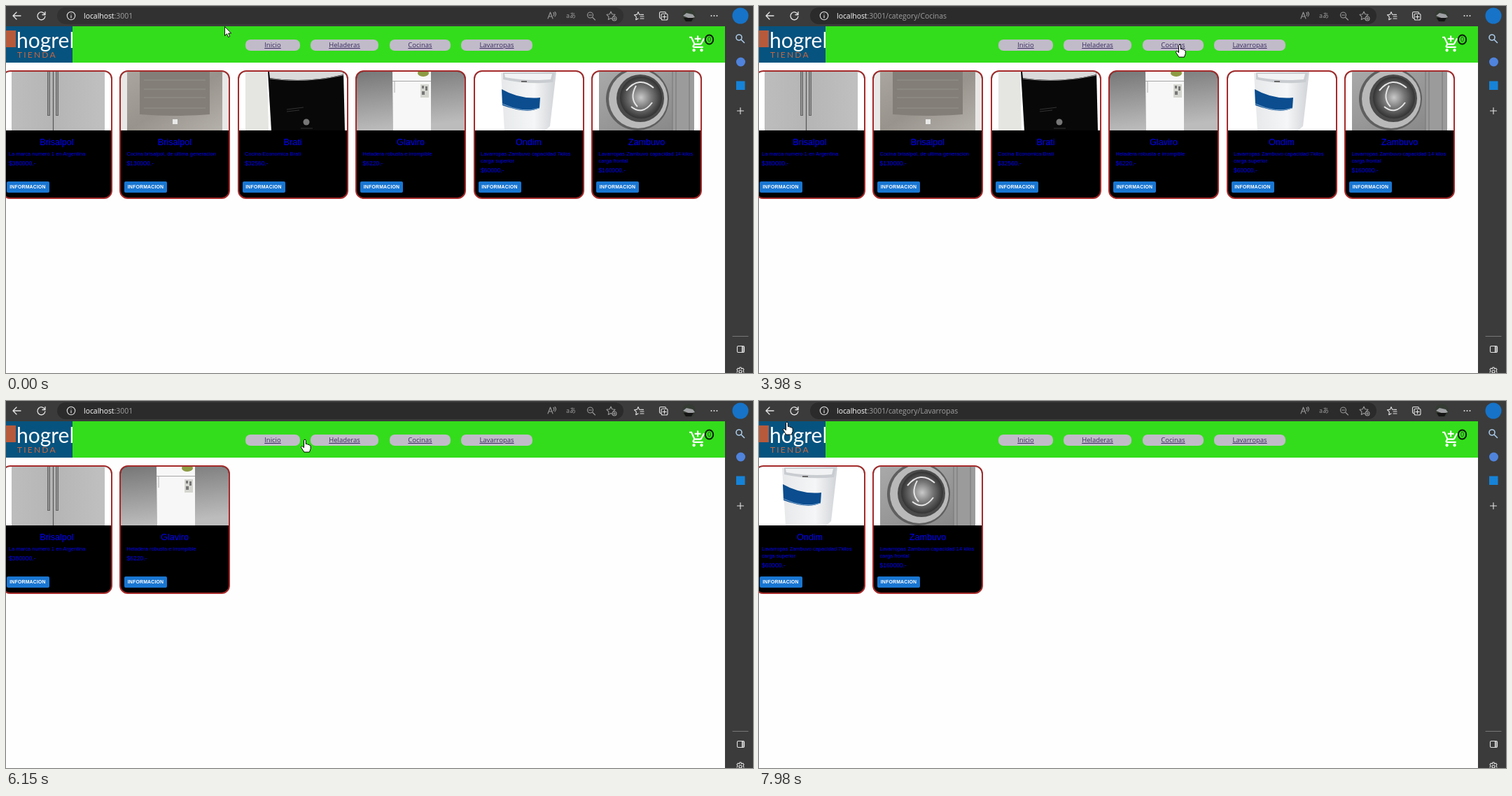
Recreate the animation shown at these times as an HTML page. Size 1067 by 525 pixels, loop 8 s.

```html
<!DOCTYPE html>
<html lang="es">
<head>
<meta charset="utf-8">
<title>Tienda</title>
<style>
html, body { margin: 0; width: 100%; height: 100%; overflow: hidden; background: #3b3b3b; }
#stage { position: relative; width: 1067px; height: 525px; overflow: hidden; background: #3b3b3b; font-family: "Liberation Sans", Arial, sans-serif; }
#stage > *, .pill, .card > * { position: absolute; }
.bar { left: 73px; top: 2px; width: 809px; height: 24px; border-radius: 12px; background: #2b2b2b; animation: barHover 8s step-end infinite; }
.url { left: 111px; top: 7px; font: 10.4px/15px "Open Sans", sans-serif; color: #fff; white-space: pre; }
.url span, .url i { color: #a0a0a0; font-style: normal; }
.url i { position: absolute; }
.page { left: 0; top: 29px; width: 1027px; height: 496px; background: #fefefe; }
.header { left: 0; top: 29px; width: 1027px; height: 52px; background: #33dd1b; }
.pill { top: 19px; height: 16px; border-radius: 7px; background: #c1bbc9; text-align: center; font: 9.5px/16px "Open Sans", sans-serif; color: #38295f; text-decoration: underline; animation: 8s step-end infinite; }
.logo { left: 0; top: 29px; width: 95px; height: 52px; overflow: hidden; background: #07537f; }
.list { left: 0; top: 92px; animation: 8s step-end infinite; }
.card { position: absolute; box-sizing: border-box; width: 158px; height: 184px; border: 2px solid #a52a2a; border-radius: 12px; background: #000; overflow: hidden; color: #00f; }
.card svg { left: 0; top: 0; width: 154px; height: 84px; }
.card h3 { margin: 0; top: 92.5px; width: 100%; text-align: center; font: 12.6px/16.8px "Liberation Sans", Arial, sans-serif; }
.card div { left: 8.5px; top: 112.7px; font-size: 7.35px; line-height: 10.7px; letter-spacing: .0107em; white-space: pre; }
.card p { margin: 1.3px 0 0; font-size: 8.4px; line-height: 12.6px; }
.card b { left: 5px; top: 157px; width: 61px; height: 16px; border-radius: 2px; background: #1976d2; color: #fff; text-align: center; font-size: 6.9px; line-height: 16px; letter-spacing: .028em; }
#cursor { left: 0; top: 0; width: 30px; height: 30px; overflow: visible; animation: move 8s step-end infinite; }
.arrow { animation: arrow 8s step-end infinite; }
.hand { animation: hand 8s step-end infinite; }

@keyframes barHover { 0%, 96.9% { background: #313131 } 9.6%, 97.8%, 100% { background: #2b2b2b } }
@keyframes urlStoves { 0%, 63.31%, 100% { visibility: hidden } 49.69% { visibility: visible } }
@keyframes urlFridges { 0%, 75.87%, 100% { visibility: hidden } 63.31% { visibility: visible } }
@keyframes urlWashers { 0% { visibility: hidden } 88.19%, 100% { visibility: visible } }
@keyframes all { 0%, 78% { visibility: visible } 53.19%, 90.06%, 100% { visibility: hidden } }
@keyframes stoves { 0%, 65.19%, 100% { visibility: hidden } 53.19% { visibility: visible } }
@keyframes fridges { 0%, 78%, 100% { visibility: hidden } 65.19% { visibility: visible } }
@keyframes washers { 0% { visibility: hidden } 90.06%, 100% { visibility: visible } }
@keyframes pressStoves { 47.87% { color: #f00 } 49.69% { color: #38295f } }
@keyframes pressFridges { 62.1% { color: #f00 } 63.31% { color: #38295f } }
@keyframes pressHome { 74.25% { color: #f00 } 75.87% { color: #38295f } }
@keyframes pressWashers { 86.3% { color: #f00 } 88.19% { color: #38295f } }
@keyframes arrow { 0%, 39.3%, 94.87% { visibility: visible } 25%, 43%, 99.68%, 100% { visibility: hidden } }
@keyframes hand { 0%, 39.3%, 94.87% { visibility: hidden } 25%, 43%, 99.68%, 100% { visibility: visible } }
@keyframes move {
  0% { transform: translate(312px, 29px) }
  9.62% { transform: translate(312px, 29px); animation-timing-function: steps(3, jump-both) }
  12.5% { transform: translate(285px, 125px); animation-timing-function: steps(3, jump-both) }
  15.38% { transform: translate(247px, 105px) }
  18.25% { transform: translate(247px, 105px); animation-timing-function: steps(6, jump-both) }
  24% { transform: translate(440px, 41px); animation-timing-function: steps(2, jump-both) }
  25.9% { transform: translate(475px, 57px) }
  32.62% { transform: translate(475px, 57px); animation-timing-function: steps(2, jump-both) }
  34.5% { transform: translate(480px, 60px) }
  38.37% { transform: translate(480px, 60px); animation-timing-function: steps(4, jump-both) }
  42.7% { transform: translate(560px, 40px); animation-timing-function: steps(2, jump-both) }
  44.87% { transform: translate(601px, 55px) }
  56.25% { transform: translate(601px, 55px); animation-timing-function: steps(3, jump-both) }
  59.25% { transform: translate(486px, 59px) }
  70.25% { transform: translate(486px, 59px); animation-timing-function: steps(2, jump-both) }
  72.12% { transform: translate(364px, 56px) }
  75.87% { transform: translate(364px, 56px); animation-timing-function: steps(1, jump-both) }
  76.8% { transform: translate(427px, 55px) }
  78% { transform: translate(427px, 55px); animation-timing-function: steps(7, jump-both) }
  84.5% { transform: translate(690px, 51px); animation-timing-function: steps(1, jump-both) }
  85.5% { transform: translate(680px, 53px) }
  94.87% { transform: translate(463px, 74px) }
  95.87% { transform: translate(260px, 42px) }
  96.9% { transform: translate(110px, 14px) }
  97.8%, 100% { transform: translate(40px, 30px) }
}
</style>
</head>
<body>
<svg width="0" height="0" style="position:absolute">
  <defs>
    <linearGradient id="steel"><stop stop-color="#bdbdbd"/><stop offset=".45" stop-color="#b5b5b5"/><stop offset="1" stop-color="#c0c0c0"/></linearGradient>
    <linearGradient id="oven" x2="1" y2="1"><stop stop-color="#aaa69f"/><stop offset=".5" stop-color="#98938c"/><stop offset="1" stop-color="#b5b1ab"/></linearGradient>
    <linearGradient id="wall" x2=".2" y2="1"><stop stop-color="#777"/><stop offset="1" stop-color="#bcbcbc"/></linearGradient>
    <linearGradient id="tub"><stop stop-color="#e6e8ea"/><stop offset=".6" stop-color="#f5f6f7"/><stop offset="1" stop-color="#cfd2d6"/></linearGradient>
    <linearGradient id="metal" x2="1" y2="1"><stop stop-color="#a9a9a9"/><stop offset="1" stop-color="#858585"/></linearGradient>
    <radialGradient id="glass"><stop stop-color="#c9c9c9"/><stop offset=".5" stop-color="#777"/><stop offset="1" stop-color="#333"/></radialGradient>
  </defs>
  <symbol id="fridge" viewBox="0 0 154 84">
    <path fill="#fff" d="M0 0h154v84H0z"/>
    <path fill="url(#steel)" d="M12 0h133v84H12z"/>
    <path stroke="#555" stroke-width="1.2" d="M71.5 0v84"/>
    <path stroke="#666" stroke-width="4" d="M65 0v63M77 0v63"/>
    <path stroke="#bbb" d="M65 0v62M77 0v62"/>
  </symbol>
  <symbol id="stove" viewBox="0 0 154 84">
    <path fill="#e9e8e6" d="M0 0h154v84H0z"/>
    <path fill="url(#oven)" d="M9 0h136v84H9z"/>
    <path fill="#837e78" d="M27 0h100v61q-50 4-100 0z"/>
    <path stroke="#9d9892" d="M33 12h88M33 25h88M33 37h88M33 52h88" stroke-width=".7"/>
    <path fill="#e8e8e8" d="M74 68h7v7h-7z"/>
  </symbol>
  <symbol id="range" viewBox="0 0 154 84">
    <path fill="#fff" d="M0 0h154v84H0z"/>
    <path fill="#e5e5e2" d="M9 0h31l2 84H9z"/>
    <path fill="#080808" d="M41 0h108l2 84H46z"/>
    <path fill="#dadada" d="M43 0h105l1 4Q95 17 44 9z"/>
    <path fill="none" stroke="#888" d="M44 10q51 7 105-5"/>
    <circle cx="96" cy="72" r="4.5" fill="#777"/>
    <path stroke="#333" d="M68 54l24-3M68 57l18-2M88 81h17"/>
  </symbol>
  <symbol id="freezer" viewBox="0 0 154 84">
    <path fill="url(#wall)" d="M0 0h154v84H0z"/>
    <path fill="#f7f7f7" d="M51 0h55v84H52z"/>
    <path stroke="#a5a5a5" d="M51 13.5h55"/>
    <ellipse cx="95" cy="2" rx="8" ry="5" fill="#8d9b43"/>
    <path fill="#d5d5d0" d="M91 18h12v19H91z"/>
    <path fill="#777" d="M93 20h3v4h-3zM98 21h3v6h-3zM93 28h4v5h-4z"/>
    <path stroke="#aaa" d="M54 14v16"/>
  </symbol>
  <symbol id="topload" viewBox="0 0 154 84">
    <path fill="#fff" d="M0 0h154v84H0z"/>
    <path fill="url(#tub)" d="M37 2l35-2h44l-9 78-7 6H42z"/>
    <path fill="#c9ccd0" d="M40 1h74l-3 14q-35 4-71-4z"/>
    <path fill="#f1f2f3" d="M42 3h68l-2 8q-32 3-65-3z"/>
    <path fill="#666" d="M66 13h8v2h-8z"/>
    <path fill="#0b4d8f" d="M38 25q26 15 55 12l-1 15q-18 9-53-4z"/>
    <path fill="none" stroke="#7ea8d0" d="M39 46q30 14 53 6"/>
  </symbol>
  <symbol id="frontload" viewBox="0 0 154 84">
    <path fill="#fff" d="M0 0h154v84H0z"/>
    <path fill="url(#metal)" d="M9 0h136v84H9z"/>
    <path fill="#9b9b9b" d="M114 0h31v84h-31z"/>
    <path stroke="#777" d="M114 0v84M119 0v84M138 0v84"/>
    <circle cx="64" cy="39" r="45" fill="#5f5f5f"/>
    <circle cx="65" cy="39" r="42" fill="#b9b9b9"/>
    <circle cx="68" cy="38" r="34" fill="#4a4a4a"/>
    <circle cx="69" cy="37" r="30" fill="url(#glass)"/>
    <path fill="none" stroke="#e5e5e5" stroke-width="2" d="M48 27q18-22 39-4M55 50q16 13 30-6M62 20q-10 18 2 30"/>
  </symbol>
</svg>

<div id="stage">
  <div class="bar"></div>
  <div class="url">localhost<span>:3001</span><i style="animation:urlStoves 8s step-end infinite">/category/Cocinas</i><i style="animation:urlFridges 8s step-end infinite">/category/Heladeras</i><i style="animation:urlWashers 8s step-end infinite">/category/Lavarropas</i></div>
  <div class="page"></div>
  <div class="header">
    <div class="pill" style="left:342px;width:78px;animation-name:pressHome">Inicio</div>
    <div class="pill" style="left:435px;width:97px;animation-name:pressFridges">Heladeras</div>
    <div class="pill" style="left:548px;width:87px;animation-name:pressStoves">Cocinas</div>
    <div class="pill" style="left:650px;width:102px;animation-name:pressWashers">Lavarropas</div>
  </div>
  <svg class="logo" viewBox="0 0 95 52">
    <path fill="#b75a3c" d="M0 6h14v24H0z"/>
    <text x="15" y="31" font-family="Lato, sans-serif" font-size="30" fill="#fff">hogrel</text>
    <text x="16" y="45" font-family="Lato, sans-serif" font-size="12" letter-spacing="2.2" fill="#c8663f">TIENDA</text>
  </svg>

  <svg width="1067" height="525" fill="none" stroke="#e4e4e4" stroke-width="1.1" stroke-linecap="round" stroke-linejoin="round" style="left:0;top:0">
    <path stroke-width="1.3" d="M21 14H10M15 9l-5 5 5 5M55.5 12a5.5 5.5 0 1 0 .4 3M56 8.500v4h-4"/>
    <circle cx="93" cy="14" r="5.7"/><path d="M93 13.5v3.5M93 11v.2"/>
    <g stroke="#999">
      <path d="M774 18l3.500-9 3.500 9M775.300 15h4.500M782 9.500q2 2 0 4.500M784 8.500q3 3 0 6.500"/>
      <circle cx="834.5" cy="13" r="4"/><path d="M838 16.500l3.500 3.500M832.500 13h4"/>
      <path d="M864 8l1.800 3.800 4.200.5-3 3 .7 4.200-3.700-2-3.700 2 .7-4.200-3-3 4.200-.5z"/>
      <circle cx="869" cy="18" r="3" fill="#2b2b2b"/><path d="M869 16.500v3M867.500 18h3"/>
    </g>
    <text x="800" y="17" font-family="Noto Sans CJK JP, Noto Sans, sans-serif" font-size="9" fill="#999" stroke="none">aあ</text>
    <path d="M903 8.500l1.500 3.600 6 .3M903 8.500l-1.600 3.600-4 .6 3 3-.7 4 3.300-1.800M906 15h5M906 18h5"/>
    <path d="M936 17.500h-1q-1.500 0-1.500-1.500v-6q0-1.500 1.500-1.500h6q1.500 0 1.500 1.500M938 11h5q2 0 2 2v5q0 2-2 2h-5q-2 0-2-2v-5q0-2 2-2zM940.500 13v5M938 15.500h5"/>
    <g stroke="none">
      <circle cx="975.5" cy="14" r="9.5" fill="#343b32"/><path fill="#9ea0a3" d="M967 14l5-4 9 2 3 4-7 2z"/><path fill="#151515" d="M968 17h14l-3 5h-8z"/>
      <g fill="#e4e4e4"><circle cx="1007.5" cy="14" r="1"/><circle cx="1011.5" cy="14" r="1"/><circle cx="1015.5" cy="14" r="1"/></g>
      <circle cx="1049" cy="14" r="11.5" fill="#1673c8"/>
      <circle cx="1049.5" cy="80" r="6.5" fill="#4f83dc"/>
      <path fill="#1683d8" d="M1043 107.500h12.500v12.500H1043z"/>
    </g>
    <g stroke="#a9c9e8" stroke-width="1.6"><circle cx="1047" cy="45" r="4"/><path d="M1050 48l4.500 4.500"/></g>
    <path d="M1044.500 150h9M1049 145.500v9"/>
    <path stroke="#777" d="M1038 472.500h22"/>
    <rect x="1044.5" y="486.5" width="10" height="9" rx="1.5"/><path d="M1051.500 487v8M1053 487v8"/>
    <circle cx="1049" cy="523" r="2"/><path d="M1047.500 519l.5-2h2l.5 2 2-.8 1.500 1.800-1 2 1 2M1047.500 519l-2-.8-1.500 1.800 1 2-1 2"/>
    <g stroke="none">
      <path transform="translate(975 41.5) scale(1.09)" fill="#fff" d="M11 9h2V6h3V4h-3V1h-2v3H8v2h3v3zm-4 9c-1.100 0-1.990.9-1.990 2S5.900 22 7 22s2-.9 2-2-.9-2-2-2zm10 0c-1.100 0-1.990.9-1.990 2s.89 2 1.990 2 2-.9 2-2-.9-2-2-2zm-9.830-3.250l.03-.12.9-1.630h7.450c.75 0 1.410-.41 1.750-1.030l3.860-7.010L19.420 4h-.01l-1.100 2-2.760 5H8.530l-.13-.27L6.160 6l-.95-2-.94-2H1v2h2l3.600 7.590-1.350 2.450c-.16.28-.25.61-.25.96 0 1.100.9 2 2 2h12v-2H7.420c-.13 0-.25-.11-.25-.25z"/>
      <ellipse cx="1004.5" cy="48" rx="5.7" ry="6.5" fill="#33dd1b" stroke="#0a1a08" stroke-width="2"/>
      <text x="1004.5" y="51.3" text-anchor="middle" font-family="Open Sans, sans-serif" font-size="9" fill="#2c3c2a">0</text>
    </g>
  </svg>

  <svg id="cursor" viewBox="0 0 30 30" stroke="#000" stroke-linejoin="round">
    <path class="arrow" fill="#fff" stroke-width=".9" d="M.5.5v13l3-2.800 2 4.800 2.200-1-2-4.500h4z"/>
    <path class="hand" fill="#fff" d="M-1.500 1.500q0-1.300 1.400-1.300T1.300 1.500v5q2-.6 2.500.8 2-.5 2.400.8 2-.2 2 1.800v3.500l-1.700 4.700H-1.200l-4-6.200q-1-1.700.4-2.200 1.200-.2 3.300 2z"/>
  </svg>
</div>

<script>
const products = [
  ["fridge", "Brisalpol", "La marca numero 1 en Argentina", 380000],
  ["stove", "Brisalpol", "Cocina brisalpol, de ultima generacion", 130000],
  ["range", "Brati", "Cocina Economica Brati", 32560],
  ["freezer", "Glaviro", "Heladera robusta e irrompible", 6220],
  ["topload", "Ondim", "Lavarropas Zambuvo capacidad 7kilos\ncarga superior", 60000],
  ["frontload", "Zambuvo", "Lavarropas Zambuvo capacidad 14 kilos\ncarga frontal", 160000],
];
const lists = { all: [0, 1, 2, 3, 4, 5], stoves: [1, 2], fridges: [0, 3], washers: [4, 5] };

const card = ([photo, name, text, price], slot) => `
  <div class="card" style="left:${-6.5 + slot * 168.5}px">
    <svg><use href="#${photo}"/></svg>
    <h3>${name}</h3>
    <div>${text}<p>$${price}.-</p></div>
    <b>INFORMACION</b>
  </div>`;

const cursor = document.getElementById("cursor");
for (const [name, ids] of Object.entries(lists)) {
  const cards = ids.map((id, slot) => card(products[id], slot)).join("");
  cursor.insertAdjacentHTML("beforebegin", `<div class="list" style="animation-name:${name}">${cards}</div>`);
}
</script>
</body>
</html>
```
